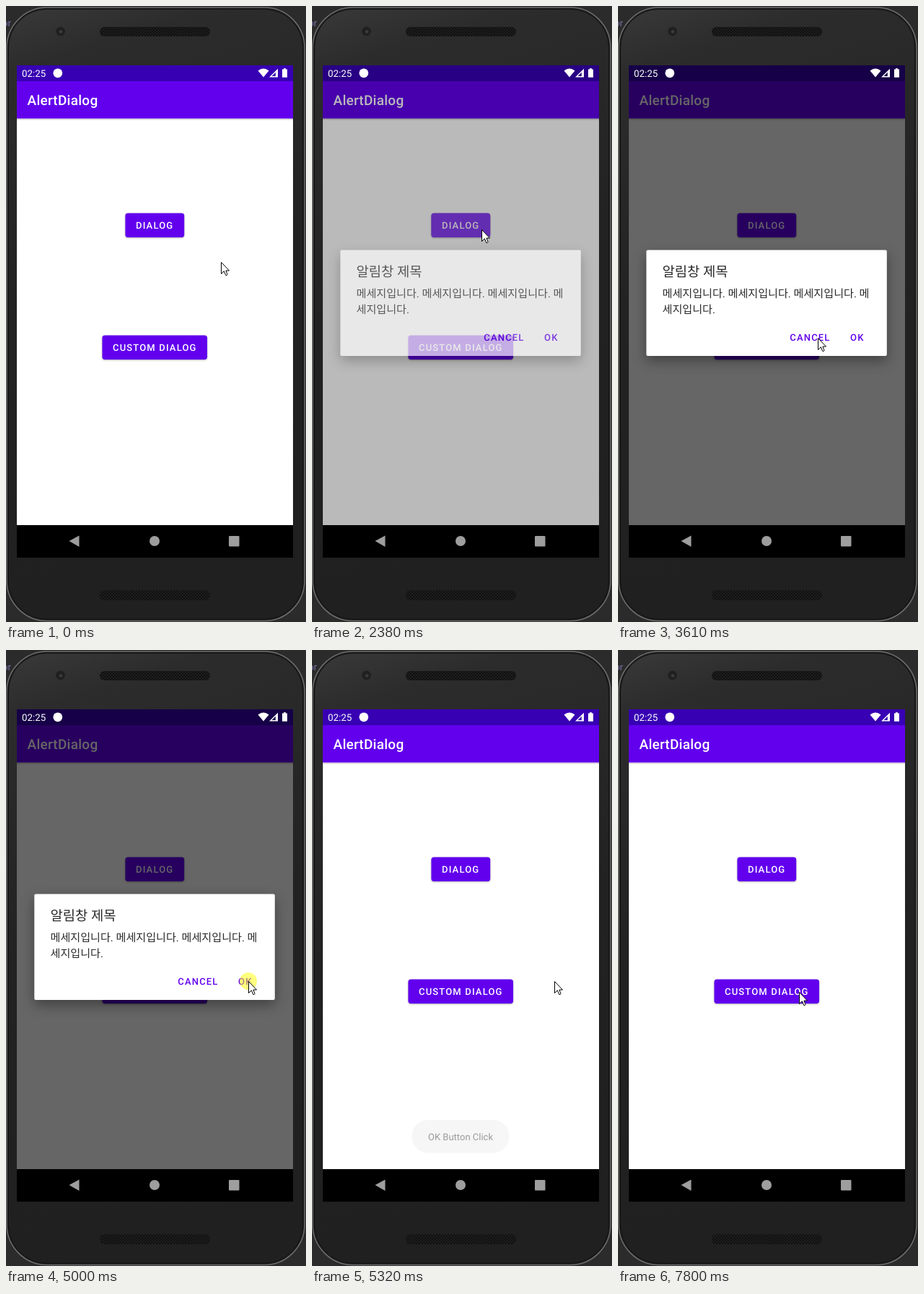
Recreate the animation shown at these times as an HTML page. Size 416 by 852 pixels, loop 8 s.

```html
<!DOCTYPE html>
<html lang="ko">
<head>
<meta charset="utf-8">
<style>
html, body { margin: 0; width: 100%; height: 100%; overflow: hidden; background: #2b2b2b; }
svg { display: block; width: 416px; height: 852px; }
text {
  font-family: Roboto, "Noto Sans CJK KR", "Noto Sans CJK", sans-serif;
  white-space: pre;
  text-rendering: geometricPrecision;
}
.caps { font-size: 13px; font-weight: 500; letter-spacing: 1.16px; }
.raised { fill: #6200ee; filter: drop-shadow(0 1px 1px rgba(0,0,0,.3)); }
#panel { filter: drop-shadow(0 7px 9px rgba(0,0,0,.36)); }
</style>
</head>
<body>
<svg viewBox="0 0 416 852">
  <defs>
    <linearGradient id="shell" x2=".15" y2="1">
      <stop offset="0" stop-color="#393939"/>
      <stop offset=".1" stop-color="#2c2c2c"/>
      <stop offset=".5" stop-color="#222"/>
      <stop offset="1" stop-color="#202020"/>
    </linearGradient>
    <linearGradient id="shade" x2="0" y2="1">
      <stop offset="0" stop-opacity=".22"/>
      <stop offset="1" stop-opacity="0"/>
    </linearGradient>
    <pattern id="mesh" width="4" height="4" patternUnits="userSpaceOnUse">
      <rect width="4" height="4" fill="#1e1e1e"/>
      <circle cx="1" cy="1" r="1.1" fill="#0e0e0e"/>
      <circle cx="3" cy="3" r="1.1" fill="#0e0e0e"/>
    </pattern>
    <clipPath id="buttonClip"><rect x="165.4" y="286.4" width="81.8" height="33.6" rx="3.7"/></clipPath>
  </defs>

  <!-- phone body -->
  <rect width="416" height="852" fill="#2b2b2b"/>
  <text x="-5" y="28" font-size="13" fill="#7d70a5">or</text>
  <rect x="1" y="2" width="413" height="848.5" rx="56" fill="#1b1b1b" stroke="#6e6e6e" stroke-width="1.5"/>
  <rect x="3.5" y="4.5" width="408" height="843.5" rx="53" fill="url(#shell)" stroke="#161616"/>
  <circle cx="75.5" cy="35" r="6.3" fill="#202020"/>
  <circle cx="76" cy="35.5" r="2.3" fill="#3c3c3c"/>
  <rect x="130" y="29" width="153" height="13" rx="6" fill="url(#mesh)"/>
  <rect x="130" y="808" width="153" height="14" rx="6" fill="url(#mesh)"/>

  <!-- app -->
  <rect x="15" y="82" width="383" height="681"/>
  <rect x="15" y="155" width="383" height="563" fill="#fff"/>
  <rect x="15" y="155.6" width="383" height="3" fill="url(#shade)"/>
  <rect x="15" y="82" width="383" height="22" fill="#3700b3"/>
  <rect x="15" y="104" width="383" height="51.6" fill="#6200ee"/>
  <text x="29.5" y="137" font-size="19" font-weight="500" letter-spacing=".25" fill="#fff">AlertDialog</text>
  <rect class="raised" x="165.4" y="286.4" width="81.8" height="33.6" rx="3.7"/>
  <rect class="raised" x="133.4" y="455.4" width="145.6" height="33.6" rx="3.7"/>
  <g clip-path="url(#buttonClip)"><circle id="ripple" cx="235" cy="309" fill="#fff"/></g>
  <text class="caps" x="180" y="308" fill="#fff">DIALOG</text>
  <text class="caps" x="148" y="477" fill="#fff">CUSTOM DIALOG</text>
  <rect id="dim" x="15" y="82" width="383" height="636"/>

  <!-- status and navigation icons -->
  <g fill="#fff">
    <text x="22" y="98" font-size="13.3">02:25</text>
    <circle cx="71.8" cy="92.8" r="6.4"/>
    <path d="M349.5 89.6Q357 83.6 364.5 89.6L357 98.6Z"/>
    <path fill-rule="evenodd" d="M365 98.5L377 86.8V98.5ZM368.6 97.1H373.8V91.8Z"/>
    <path d="M383 87.5H385V86.2H388V87.5H390V98.7H383Z"/>
  </g>
  <g fill="#9e9e9e">
    <path d="M87.5 740L101.5 732.5V748Z"/>
    <circle cx="206" cy="740" r="7"/>
    <rect x="309" y="733" width="14.5" height="14.5" rx="1"/>
  </g>

  <g id="dialog">
    <rect id="panel" x="39.3" y="337.5" width="333.5" height="146.5" rx="2" fill="#fff"/>
    <g fill="#292929">
      <text x="61.5" y="373.5" font-size="18.8">알림창 제목</text>
      <text x="61.5" y="402.5" font-size="15.1">메세지입니다. 메세지입니다. 메세지입니다. 메</text>
      <text x="61.5" y="424.5" font-size="15.1">세지입니다.</text>
    </g>
    <text class="caps" x="238.3" y="463" fill="#6200ee">CANCEL</text>
    <text class="caps" x="322" y="463" fill="#6200ee">OK</text>
  </g>
  <g id="toast">
    <rect x="138.5" y="650" width="135" height="45.5" rx="22" fill="#eee"/>
    <text x="161" y="678" font-size="13" fill="#333">OK Button Click</text>
  </g>

  <g id="pointer">
    <circle id="press" r="12" fill="#ff0" opacity=".5"/>
    <path d="M.5 .5V16.5L4.3 12.7L6.8 18.5H8.2L9 17.3L6.9 12H11.5Z" fill="#fff" stroke="#000" stroke-linejoin="round"/>
  </g>
</svg>
<script>
const $ = id => document.getElementById(id);
const LOOP = 8000, FIRST = 1440, STEP = 77.56;

// pointer moves: start step, end step, target x, y
const start = [298, 354];
const moves = [[-1, 7, 235, 309], [20, 28, 277, 459], [40, 43, 336, 458], [70, 82, 251, 473]];

const ramp = (k, a, b) => Math.min(1, Math.max(0, (k - a) / (b - a)));
const smooth = p => p * p * (3 - 2 * p);

function pointerAt(k) {
  let [x, y] = start;
  for (const [a, b, tx, ty] of moves) {
    const p = smooth(ramp(k, a, b));
    x += (tx - x) * p;
    y += (ty - y) * p;
  }
  return [Math.round(x), Math.round(y)];
}

// level of a fade that opens at step 11 and closes at step 48
function fade(k, opening, closing) {
  if (k < 11) return 0;
  if (k < 48) return opening[k - 11] ?? 1;
  return closing[k - 48] ?? 0;
}

function draw(ms) {
  const k = Math.max(-1, Math.floor((ms - FIRST + 8) / STEP));
  $("pointer").setAttribute("transform", `translate(${pointerAt(k)})`);
  $("press").style.display = k === 8 || k === 9 || k === 46 || k === 47 ? "" : "none";
  $("ripple").setAttribute("r", 80 * ramp(k, 8, 11));
  $("ripple").style.opacity = .24 * (1 - ramp(k, 12, 14));
  $("dim").style.opacity = .6 * fade(k, [.1, .45, .8], [.65, .2]);
  $("dialog").style.opacity = fade(k, [.2, .68, .92], [.6, .15]);
  const shown = 1 - (1 - ramp(k, 48, 55)) ** 2;
  $("toast").style.opacity = shown * (1 - ramp(k, 70, 77));
}

function tick() {
  draw(performance.now() % LOOP);
  requestAnimationFrame(tick);
}
tick();
</script>
</body>
</html>
```
